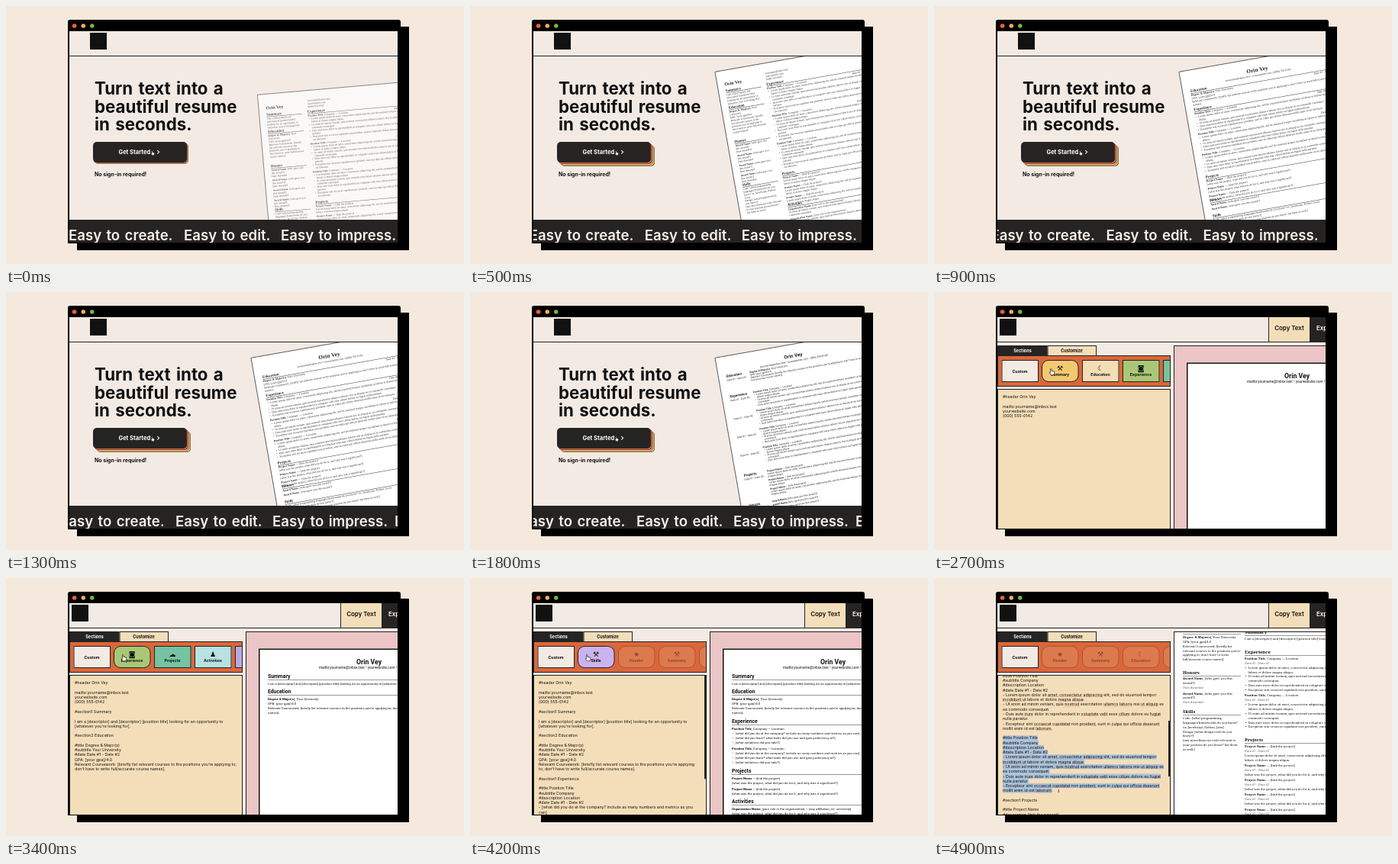
An HTML page for the animation above (5 s loop, 600x338 px).

```html
<!DOCTYPE html>
<html lang="en">
<head>
<meta charset="utf-8">
<title>Resume builder</title>
<style>
html, body { margin: 0; width: 100%; height: 100%; overflow: hidden; background: #f5e8dc; }
/* Laid out four times larger and scaled back, so tiny type and hairlines keep their exact size. */
#stage { position: absolute; left: 0; top: 0; width: 600px; height: 338px; overflow: hidden; zoom: 4; transform: scale(.25);
  transform-origin: 0 0; font-family: Inter, sans-serif; color: #111; }
#stage .a { position: absolute; box-sizing: border-box; }
.t { line-height: 0; white-space: pre; }
.mid { transform: translateX(-50%); }
.li { padding-left: 1.15em; position: relative; }
.li::before { content: "•"; position: absolute; left: .2em; }
.e + .e { margin-top: .4em; }
.r { float: right; }
.one { white-space: nowrap; }
i { color: #666; }
u { text-decoration: underline dotted #d33 .5px; text-underline-offset: .5px; }
.sel { background: #a9c1da; }
.serif { font-family: "Liberation Serif", serif; }
.book { font-family: "Noto Serif", serif; }
.sans { font-family: Roboto, sans-serif; }
</style>
</head>
<body>
<div id="stage"></div>
<script>
const LOOP = 5000, TICK = 100, EDITOR_AT = 2400, CUSTOM_AT = 4700;
const CLICKS = [2600, 2850, 3100, 3500, 3700, 3900, 4100, 4400];
const NAME = 'Orin Vey', MAIL = 'yourname@inbox.test', SITE = 'yourwebsite.com', PHONE = '(000) 555-0142';
const INK = '#262423', CREAM = '#f3eae4', TAN = '#f4deb9';

// Bars mark where the editor wraps.
const LOREM = [
  'Lorem ipsum dolor sit amet, consectetur adipiscing elit, sed do eiusmod tempor|incididunt ut labore et dolore magna aliqua.',
  'Ut enim ad minim veniam, quis nostrud exercitation ullamco laboris nisi ut aliquip ex|ea commodo consequat.',
  'Duis aute irure dolor in reprehenderit in voluptate velit esse cillum dolore eu fugiat|nulla pariatur.',
  'Excepteur sint occaecat cupidatat non proident, sunt in culpa qui officia deserunt|mollit anim id est laborum.'];
const flat = LOREM.map(s => s.replace('|', ' '));
const DATES = 'Date #1 - Date #2';
const SUMMARY = 'I am a [descriptor] and [descriptor] [position title] looking for an opportunity to [whatever you’re looking for].';
const COURSES = 'Relevant Coursework: [briefly list relevant courses to the positions you’re applying to; don’t have to write full/accurate course names].';
const PROJECT = '[what was the project, what did you do for it, and why was it significant?]';
const TASKS = ['[what did you do at the company? include as many numbers and metrics as you can]',
  '[what did you learn? what tools did you use and gain proficiency at?]', '[what initiatives did you take?]'];

const rect = (x, y, w, h, css, html = '', cls = '') =>
  `<div class="a ${cls}" style="left:${x}px;top:${y}px;width:${w}px;height:${h}px;${css}">${html}</div>`;
const fill = (x, y, w, h, color, css = '') => rect(x, y, w, h, `background:${color};${css}`);
const text = (x, y, size, str, css = '', cls = '') =>
  `<div class="a t ${cls}" style="left:${x}px;top:${y}px;font-size:${size}px;${css}">${str}</div>`;
const block = (x, y, w, size, lead, html, cls = '') =>
  `<div class="a ${cls}" style="left:${x}px;top:${y}px;width:${w}px;font-size:${size}px;line-height:${lead}px">${html}</div>`;
const clip = (top, right, bottom, left, html) =>
  rect(0, 0, 600, 338, `clip-path:inset(${top}px ${right}px ${bottom}px ${left}px)`, html);
const entry = html => `<div class="e">${html}</div>`;
const times = (n, s) => Array(n).fill(s).join('');
const bullets = (list, cls = '') => list.map(s => `<div class="li ${cls}">${s}</div>`).join('');
const hand = (x, y, w = 8) => `<svg class="a" style="left:${x}px;top:${y}px" width="${w}" height="${w * 1.25}" viewBox="0 0 8 10">
  <path d="M2 5V1.2q.8-1 1.5 0V4q2.5 0 3.7.7V7L6.3 9.3H3L.6 6.2q0-1 1.4-.2z" fill="#fff" stroke="#111" stroke-width=".7"/></svg>`;

const position = '<b>Position Title</b>, Company — Location';
const degree = '<b>Degree & Major(s)</b>, Your University';
const award = '<b>Award Name</b>, [who gave you this award?]';
const project = '<b>Project Name</b> — [link the project]';
const right = `<span class="r">${DATES}</span>`;

// Sets a page: style holds title size, body size, leading, body offset and rule offset.
const sections = (style, list) => list.map(([x, y, w, title, body]) =>
  text(x, y, style.head, title, 'font-weight:700') +
  (style.rule ? fill(x, y + style.rule, w, .5, '#333') : '') +
  block(x, y + style.gap, w, style.size, style.lead, body)).join('');

const SKILLS = 'Code: [what programming languages/frameworks do you know? ex. JavaScript, Python, Java]<br>Design: [what design tools do you know?]<br>[any miscellaneous tools relevant to your position do you know? list them as well.]';
const contact = `${MAIL} • ${SITE} • ${PHONE}`;

function splitPage() {
  const work = entry(position + right + bullets(flat));
  return text(9, 17.7, 6, NAME, 'font-weight:700') +
    block(64, 11, 80, 3.4, 4, [MAIL, SITE, PHONE].join('<br>')) +
    sections({ head: 4.8, size: 3.5, lead: 3.95, gap: 3.6, rule: 2.8 }, [
      [9, 26.5, 47, 'Summary', SUMMARY],
      [9, 49, 47, 'Education', `${degree}<br>GPA: [your gpa]/4.0<br>${COURSES}`],
      [9, 94.2, 47, 'Honors', times(4, entry(award + '<br>Date Awarded'))],
      [9, 151.7, 47, 'Skills', SKILLS],
      [63, 27.3, 138, 'Experience', times(3, work)],
      [63, 146.5, 138, 'Projects', times(3, entry(project + '<br>' + flat[0]))],
      [63, 188.3, 138, 'Activities', times(3, entry('<b>Organization Name</b>, [your role in the organization]<br>' + flat[1]))]]);
}

function centredPage() {
  const work = entry(position + right + bullets(flat));
  return text(101, 14.4, 7.4, NAME, 'font-weight:700', 'mid') + text(101, 21.5, 3.7, contact, '', 'mid') +
    sections({ head: 5, size: 3.75, lead: 4.3, gap: 3.8, rule: 3.2 }, [
      [10, 26.8, 190, 'Education', `${degree}${right}<br>GPA: [your gpa]/4.0<br>${COURSES}`],
      [10, 51.5, 190, 'Experience', times(3, work)],
      [10, 141.2, 190, 'Projects', times(3, entry(project + '<br>' + PROJECT))],
      [10, 172.5, 190, 'Honors', times(2, entry(award + right))],
      [10, 193, 190, 'Skills', SKILLS]]);
}

function datedPage() {
  const rows = [0, 1, 2, 3].map(i => 53 + 24.5 * i);
  const column = (y, html) => block(41, y - 2, 160, 3.3, 3.5, html);
  return text(101, 14.4, 6.4, NAME, 'font-weight:700', 'mid') + text(101, 21.5, 3.5, contact, '', 'mid') +
    sections({ head: 4.6, size: 3.3, lead: 4.2, gap: 3.5 }, [
      [10, 26, 30, 'Education', DATES], [10, 53, 30, 'Experience', DATES],
      [10, 158, 30, 'Projects', DATES], [10, 198, 30, 'Honors', DATES]]) +
    rows.slice(1).map(y => block(10, y + 3.5, 30, 3.3, 4.2, DATES)).join('') +
    column(26.5, `${degree}<br>GPA: [your gpa]/4.0<br>${COURSES}`) +
    rows.map(y => column(y, position + bullets(flat.slice(0, 3)))).join('') +
    column(158, times(3, entry(project + '<br>' + flat[0]))) +
    column(198, times(3, entry(award)));
}

const PAGES = [['serif', splitPage()], ['serif', centredPage()], ['sans', datedPage()]];

const shell = logoX => fill(83, 33, 430, 277, CREAM) + fill(logoX, 35, 22, 22, '#111') + fill(83, 65, 430, 1, '#222');

function hero(t) {
  const p = 1 - (1 - Math.min(1, t / 500)) ** 3;
  const [font, page] = PAGES[Math.min(2, Math.floor(t / 800))];
  const paper = rect(329 - 8.5 * p, 116 - 30 * p, 208, 290,
    `background:#fff;border:.8px solid #333;opacity:${.72 + .28 * p};transform-origin:0 0;transform:rotate(${-5 - 5 * p}deg);color:#222`, page, font);
  const spread = .4 + .6 * p;
  const stack = ['#e0653d', '#e9a5a0', '#efc94f']
    .flatMap((c, i) => [[c, 1.6 * i + 1.3], [INK, 1.6 * i + 1.7]])
    .map(([c, d]) => `${d * spread}px ${d * spread}px 0 ${c}`).join();
  const slogan = [0, 438].map(d => [['create', 82], ['edit', 233], ['impress', 360]].map(([word, x]) =>
    text(x + d - t * .0084, 300, 18.6, `Easy to ${word}.`, 'font-weight:600;word-spacing:1.7px;color:#f8f1eb')).join('')).join('');
  return shell(110) + clip(66, 87, 58, 83, paper) +
    ['Turn text into a', 'beautiful resume', 'in seconds.'].map((s, i) =>
      text(116, 108.3 + 23.4 * i, 22.3, s, 'font-weight:700;word-spacing:2px')).join('') +
    fill(114, 178, 123, 27, INK, `border-radius:5px;box-shadow:${stack}`) +
    text(147.5, 191.3, 7.5, 'Get Started', 'font-weight:700;color:#fff') +
    rect(196.7, 189.4, 3.8, 3.8, 'border:solid #fff;border-width:1px 1px 0 0;transform:rotate(45deg)') + hand(189.5, 189, 5.5) +
    text(116, 220.3, 7, 'No sign-in required!', 'font-weight:700') +
    fill(83, 280, 430, 30, INK) + slogan;
}

const job = `#title Position Title\n#subtitle Company\n#description Location\n#date ${DATES}`;
const PARTS = [
  ['Header', '★', '#f0b9b6', `#header ${NAME}\n\nmailto:${MAIL}\n${SITE}\n${PHONE}`],
  ['Summary', '⚒', '#f3c970', '#section1 Summary\n\nI am a [descriptor] and [descriptor] [position title] looking for an opportunity to\n[whatever you’re looking for].'],
  ['Education', '☾', '#f2ddb5', `#section2 Education\n\n#title Degree & Major(s)\n#subtitle Your University\n#date ${DATES}\nGPA: [your gpa]/4.0\n` +
    COURSES.replace('to; don', 'to;\ndon')],
  ['Experience', '◙', '#a9c877', '#section1 Experience\n\n' + job + '\n' + TASKS.map(s => '- ' + s.replace('you can', 'you\ncan')).join('\n')],
  ['Projects', '☁', '#75c3a1', '#section1 Projects\n\n#title Project Name\n#description [link the project]\n' + PROJECT],
  ['Activities', '♟', '#b6e2e1', '#section1 Activities\n\n#title Organization Name\n' + PROJECT],
  ['Honors', '✪', '#b7aae2', '#section2 Honors\n\n#title Award Name\n#date Date Awarded'],
  ['Skills', '⚒', '#cbb4ee', '#section2 Skills\n\nCode: [what programming languages do you know?]']];

function toolbar(done) {
  const order = [...PARTS.slice(done), ...PARTS.slice(0, done)].slice(0, 4);
  return fill(88.5, 89, 48.5, 29, CREAM, 'border:1px solid #222') +
    text(112.5, 103.5, 5.3, 'Custom', 'font-weight:700', 'mid') +
    order.map(([label, icon, color], i) => {
      const used = i >= PARTS.length - done, x = 141 + 53 * i;
      const ink = used ? '#96452a' : '#111', round = used || i == 0 ? 9 : 0;
      return fill(x, 89, 48.5, 29, used ? '#dc7a4e' : color, `border:1px solid ${used ? '#b4522f' : '#222'};border-radius:${round}px`) +
        text(x + 24, 99.5, 9, icon, `color:${ink};font-family:'DejaVu Sans',sans-serif`, 'mid') +
        text(x + 24, 108, 5.2, label, `color:${ink};font-weight:700`, 'mid');
    }).join('');
}

function draft(done) {
  let copy = PARTS.slice(0, done).map(p => p[3]).join('\n\n');
  const full = done > 3;
  if (full) copy = copy.replace('applying to;\ndon', 'applying\nto; don');
  const lines = copy.split('\n');
  return lines.map((s, i) => text(90, 137.5 + 6.27 * i, 5.26, s)).join('') +
    (full ? fill(307, 128, 2.2, Math.min(150, 183 * 34 / lines.length), INK) : '');
}

function preview(done) {
  const list = [
    [128.5, 'Summary', SUMMARY],
    [149, 'Education', `${degree}<br>GPA: [your gpa]/4.0<br>${COURSES.replace(' names', '<br>names')}`],
    [188, 'Experience', times(2, entry(position + bullets(TASKS)))],
    [253, 'Projects', times(2, entry(project + '<br>' + PROJECT))],
    [293, 'Activities', '<b>Organization Name</b>, [your role in the organization] — [any affiliation, ex. university]<br>' + PROJECT]];
  return fill(314, 70, 200, 241, '#ecc5c6', 'border:1px solid #222') +
    fill(331, 92.5, 290, 300, '#fff', 'border:1.5px solid #111') +
    rect(0, 0, 600, 338, '', (done ? text(475.5, 109.5, 8.7, NAME, 'font-weight:700', 'mid') +
      text(410, 117.5, 4.7, `mailto:${contact}`) : '') +
      sections({ head: 6.8, size: 4.35, lead: 6, gap: 6.5, rule: 4.6 },
        list.slice(0, Math.max(0, done - 1)).map(([y, title, body]) => [343, y, 266, title, `<div class="one">${body}</div>`])), 'sans');
}

const spell = s => s.replace(/\b(amet|consectetur|adipiscing|incididunt|ut|magna|aliqua|nostrud|ullamco|laboris|aliquip|irure|voluptate|velit|cillum|fugiat|occaecat|cupidatat|proident|culpa|officia|deserunt|laborum)\b/g, '<u>$1</u>');

function selection(t) {
  const p = Math.min(1, (t - CUSTOM_AT + 100) / 300), first = 13, last = first + 12 * p;
  const entryLines = [...job.split('\n'), ...LOREM.flatMap(s => ('- ' + s).split('|')), ''];
  const lines = [...entryLines, ...entryLines, '#section1 Projects', '', '#title Project Name', '#description [link the project]'];
  return lines.map((s, i) => text(90, 128 + 6.27 * i, 5.26,
    `<span ${i >= first && i < last ? 'class="sel"' : ''}>${spell(s)}</span>`)).join('') +
    text(92 + 70 * p, 207 + 72 * p, 7, 'I', '', 'serif') + fill(307, 187, 2.2, 73, INK);
}

function customPreview() {
  const date = `<br><i>${DATES}</i>`;
  const work = entry(position + date + bullets(flat.slice(0, 2)) + bullets(flat.slice(2), 'one'));
  return fill(314, 70, 200, 241, '#fff', 'border:1px solid #222') +
    rect(0, 0, 600, 338, '', sections({ head: 5.9, size: 4.05, lead: 5.85, gap: 5.6, rule: 4.4 }, [
      [326, 69, 76, 'Education', `${degree}<br>GPA: [your gpa]/4.0<br>${COURSES}`],
      [326, 123.5, 76, 'Honors', times(2, entry(award + '<br><i>Date Awarded</i>'))],
      [326, 175, 76, 'Skills', SKILLS],
      [407, 71, 187, 'Summary', `<div class="one">${SUMMARY}</div>`],
      [407, 97, 187, 'Experience', times(2, work)],
      [407, 212, 187, 'Projects', entry(`${project}${date}<br>${flat[0]}`) +
        times(4, entry(`${project}${date}<div class="one">${PROJECT}</div>`))]]), 'book');
}

function editor(t) {
  const done = CLICKS.filter(c => t >= c).length, custom = t >= CUSTOM_AT;
  return shell(86) +
    fill(438, 33, 55, 33, TAN, 'border:solid #222;border-width:0 1px 1px') +
    text(465.5, 47, 7.9, 'Copy Text', 'font-weight:600', 'mid') +
    fill(493, 33, 30, 33, INK) + text(501, 47, 7.9, 'Export', 'font-weight:600;color:#fff') +
    fill(83, 70, 66, 13, INK) + text(116, 77, 5.5, 'Sections', 'font-weight:700;color:#fff', 'mid') +
    fill(148.5, 70, 64.5, 14, TAN, 'border:1px solid #222') + text(180.5, 77, 5.5, 'Customize', 'font-weight:700', 'mid') +
    fill(83, 83, 227, 41, '#d9673c', 'border:1px solid #222') +
    clip(84, 291, 215, 84, toolbar(done)) +
    fill(83, 127, 227, 190, TAN, 'border:1.2px solid #222') +
    clip(128, 291, 28, 84, custom ? selection(t) : draft(done)) +
    clip(70, 87, 28, 314, custom ? customPreview() : preview(done)) +
    (custom ? '' : hand(150.5, 99.5));
}

const dot = (x, color) => fill(x - 2.8, 23.2, 5.6, 5.6, color, 'border-radius:50%');
const frame = fill(93, 27, 435, 293, '#000') + fill(81, 18, 436, 293, '#000', 'border-radius:3px 3px 0 0') +
  dot(89.6, '#e8603c') + dot(101.2, '#f1b05a') + dot(112.8, '#7db241');

const stage = document.getElementById('stage'), start = performance.now();
let shown = -1;
function draw() {
  const t = Math.floor((performance.now() - start) % LOOP / TICK) * TICK;
  if (t !== shown) {
    shown = t;
    stage.innerHTML = frame + clip(33, 87, 28, 83, t < EDITOR_AT ? hero(t) : editor(t));
  }
  requestAnimationFrame(draw);
}
draw();
</script>
</body>
</html>
```
